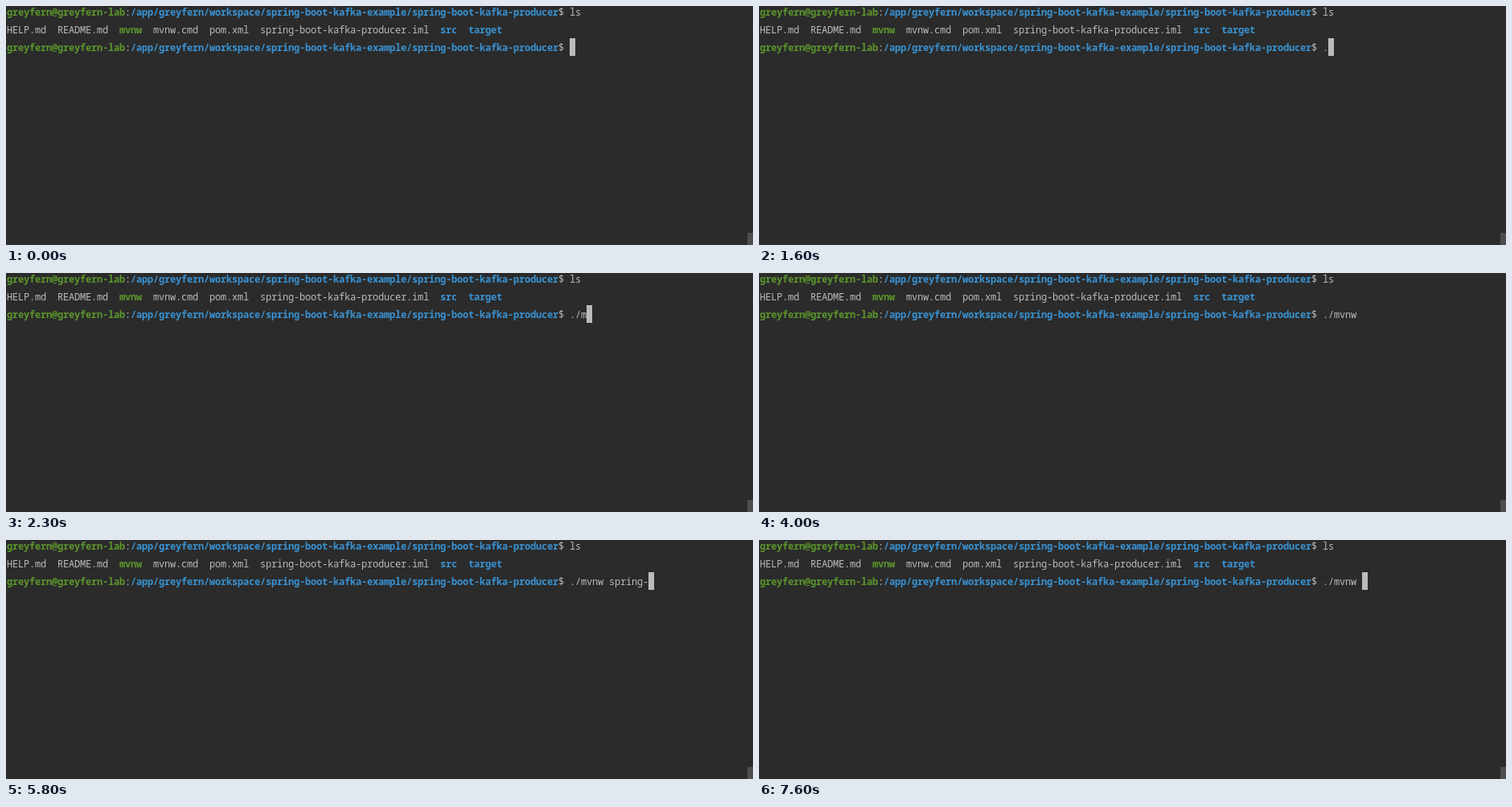
An HTML page with a canvas for the animation above (8000 ms loop, 929 by 297 pixels).

```html
<!DOCTYPE html>
<html lang="en">
<head>
<meta charset="utf-8">
<title>Terminal</title>
<style>
  html, body { margin: 0; width: 100%; height: 100%; overflow: hidden; background: #2b2b2b; }
  canvas { display: block; }
</style>
</head>
<body>
<canvas id="stage" width="929" height="297"></canvas>
<script>
const ctx = document.getElementById('stage').getContext('2d');
const LOOP = 8000, CELL = 7, ROW = 22, INPUT_COL = 100;
const GREY = '#bbbbbb', GREEN = '#5c962c', BLUE = '#3993d4';
const MONO = '12px "Noto Sans Mono", monospace';
const SANS = '14.3px "Noto Sans CJK KR", "Noto Sans CJK JP", "Noto Sans CJK SC", "Noto Sans", sans-serif';
const COMMAND = './mvnw spring-';

const PROMPT = [
  ['greyfern@greyfern-lab', GREEN], [':', GREY],
  ['/app/greyfern/workspace/spring-boot-kafka-example/spring-boot-kafka-producer', BLUE],
  ['$ ', GREY]
];
const LISTING = [
  ['HELP.md  README.md  ', GREY], ['mvnw', GREEN],
  ['  mvnw.cmd  pom.xml  spring-boot-kafka-producer.iml  ', GREY],
  ['src  target', BLUE]
];

// [time, typed characters, cursor hidden]
const STEPS = [
  [0, 0], [500, 0, true], [1100, 0], [1600, 1], [1700, 2], [2300, 3],
  [2500, 4], [3000, 5], [3400, 6], [4000, 6, true], [4600, 7], [5100, 7, true],
  [5200, 8], [5300, 9], [5400, 10], [5500, 11], [5600, 12], [5700, 13], [5800, 14],
  [6800, 13], [6900, 12], [7100, 11], [7200, 10], [7300, 9], [7500, 8], [7600, 7]
];

function rect(x, y, w, h, color) {
  ctx.fillStyle = color;
  ctx.fillRect(x, y, w, h);
}

function write(row, runs) {
  let col = 0;
  for (const [text, color] of runs) {
    ctx.font = (color === GREY ? '500 ' : '600 ') + MONO;
    ctx.fillStyle = color;
    for (const ch of text) ctx.fillText(ch, 1 + CELL * col++, 12 + ROW * row);
  }
}

function label(text, x, y, color = GREY, weight = '') {
  ctx.font = weight + SANS;
  ctx.fillStyle = color;
  ctx.fillText(text, x, y);
}

function drawPopup() {
  ctx.beginPath();
  ctx.moveTo(703.5, 70.5);
  ctx.lineTo(711.5, 62.5);
  ctx.lineTo(719.5, 70.5);
  ctx.lineTo(940, 70.5);
  ctx.lineTo(940, 278.5);
  ctx.arcTo(687.5, 278.5, 687.5, 70.5, 4);
  ctx.arcTo(687.5, 70.5, 703.5, 70.5, 4);
  ctx.closePath();
  ctx.save();
  ctx.shadowColor = 'rgba(0, 0, 0, 0.35)';
  ctx.shadowBlur = 14;
  ctx.shadowOffsetY = 4;
  ctx.fillStyle = '#4b4d4d';
  ctx.fill();
  ctx.restore();
  ctx.strokeStyle = '#636565';
  ctx.stroke();

  label('Run highlighted commands using IDE', 699, 100, GREY, 'bold ');
  ['Press Ctrl+Enter to run the command', 'using the corresponding IDE feature.',
   'Press Ctrl+Shift+Enter to debug if', 'applicable.']
    .forEach((line, i) => label(line, 699, 128 + 23 * i));
  label('Configure...', 699, 225, '#589df6');

  ctx.beginPath();
  ctx.roundRect(699.5, 241.5, 71, 23, 2);
  ctx.fillStyle = '#4c5052';
  ctx.fill();
  ctx.strokeStyle = '#5e6264';
  ctx.stroke();
  ctx.textAlign = 'center';
  label('Got It', 735.5, 260);
  ctx.textAlign = 'left';
}

function draw(now) {
  const t = now % LOOP;
  const [, typed, hidden] = STEPS.findLast(([start]) => start <= t);
  const popup = t >= 1700 && t < 2300;
  const inputX = 1 + CELL * INPUT_COL;

  rect(0, 0, 929, 297, '#2b2b2b');
  rect(922, 282, 7, 15, '#4d4d4d');
  if (popup) rect(inputX, 41, CELL * typed, ROW - 2, '#45503f');
  write(0, [...PROMPT, ['ls', GREY]]);
  write(1, LISTING);
  write(2, [...PROMPT, [COMMAND.slice(0, typed), GREY]]);
  if (!hidden) rect(inputX + CELL * typed, 40, CELL, ROW, GREY);
  if (popup) drawPopup();
  requestAnimationFrame(draw);
}

requestAnimationFrame(draw);
</script>
</body>
</html>
```
